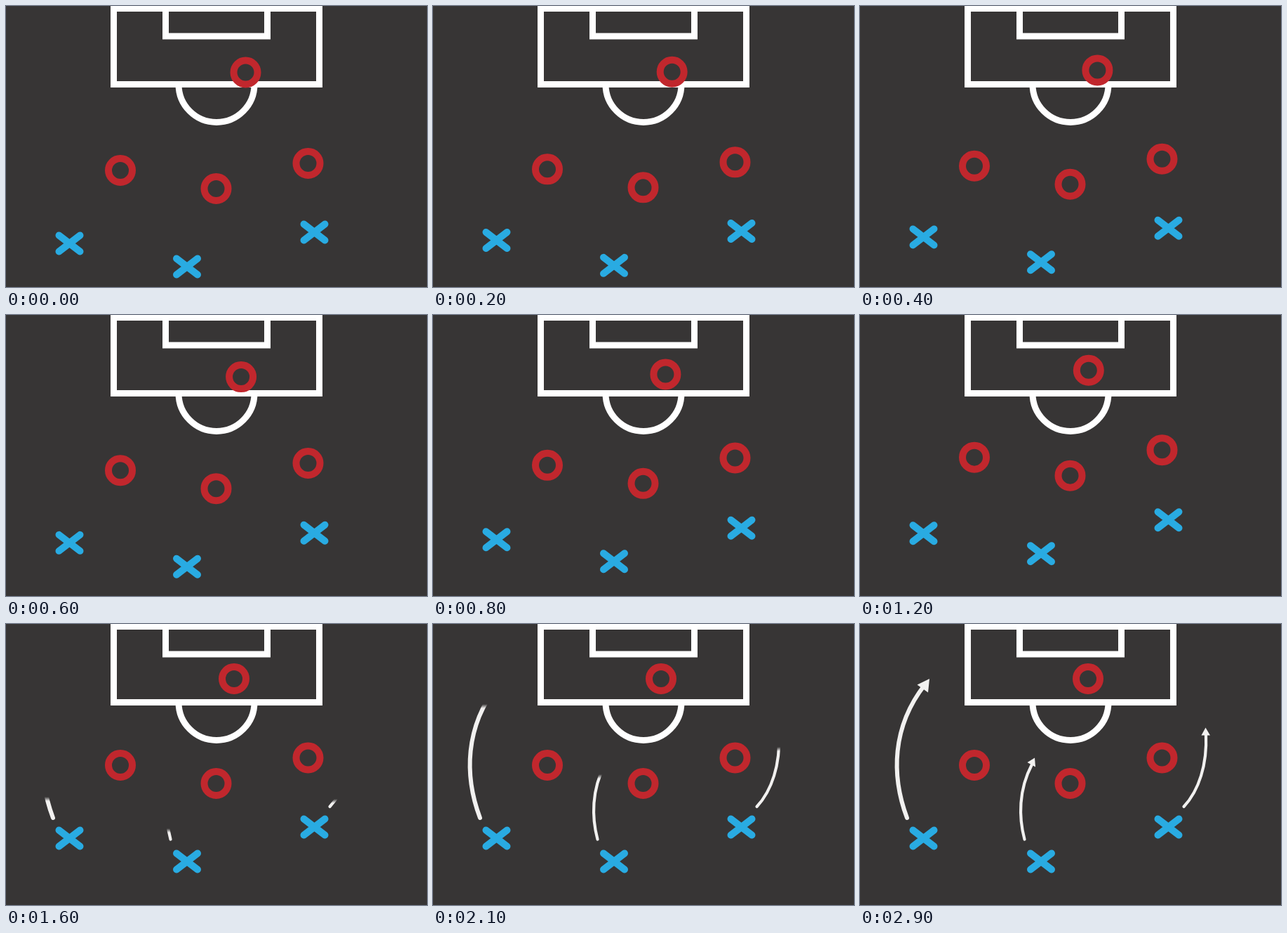
These frames come from a looping animation (600x400 px, 3000 ms). An HTML page with a canvas:

```html
<!DOCTYPE html>
<html lang="en">
<head>
<meta charset="utf-8">
<title>Football tactics</title>
<style>
html, body { margin: 0; overflow: hidden; background: #373535; }
canvas { display: block; }
</style>
</head>
<body>
<canvas id="stage" width="600" height="400"></canvas>
<script>
const ctx = document.getElementById('stage').getContext('2d');
const LOOP = 3000, STEP = 100;

const sine = p => (1 - Math.cos(Math.PI * p)) / 2;
const linear = p => p;

// Start position, travel, duration and easing of each player
const defenders = [
  { x: 341.5, y: 94.5, dx: -16.5, dy: -16.5 },
  { x: 163, y: 234, dy: -33 },
  { x: 299.5, y: 260, dy: -33 },
  { x: 430.5, y: 224, dy: -33.5 }
];
const attackers = [
  { x: 90.5, y: 338, dy: -33, time: 1450, ease: linear },
  { x: 258, y: 371, dy: -33 },
  { x: 439.5, y: 322, dy: -33, time: 1470 }
];

// Each arrow is wiped upwards; "edge" is the wipe height at 1600 ms, "speed" in px/ms
const arrows = [
  { line: 'M67,276 C44,215 46,146 92,87', head: 'M99,78 L81.5,86.5 L97,97.5Z',
    width: 6, edge: 249, speed: 0.264 },
  { line: 'M234.5,306.5 C226,275 226,236 245,200', head: 'M249,190.5 L238.5,197 L250,203.5Z',
    width: 4.2, edge: 294, speed: 0.154 },
  { line: 'M461.5,260 C483,237 495,200 493,157', head: 'M492.5,147.5 L486.5,158.5 L499,158.5Z',
    width: 4.2, edge: 252, speed: 0.148 }
].map(a => ({ ...a, line: new Path2D(a.line), head: new Path2D(a.head) }));

const pitch = new Path2D(
  'M153.5,3.5H446.5V111.5H153.5Z M227.5,3.5V43H372.5V3.5 M246,111.5A54,54 0 0 0 354,111.5');
const ring = new Path2D('M17,0A17,17 0 1 1 -17,0A17,17 0 1 1 17,0Z');
const cross = new Path2D('M-15,-11.5L15,11.5M15,-11.5L-15,11.5');

function stroke(path, color, width, cap = 'butt') {
  ctx.strokeStyle = color;
  ctx.lineWidth = width;
  ctx.lineCap = cap;
  ctx.stroke(path);
}

function drawPlayer({ x, y, dx = 0, dy, time = 1400, ease = sine }, t, shape, color) {
  const p = ease(Math.min(t / time, 1));
  ctx.save();
  ctx.translate(x + dx * p, y + dy * p);
  stroke(shape, color, 10, 'round');
  ctx.restore();
}

function drawArrow({ line, head, width, edge, speed }, t) {
  const y = edge - speed * (t - 1600);
  const fade = ctx.createLinearGradient(0, y - 3, 0, y + 3);
  fade.addColorStop(0, 'rgba(242,241,240,0)');
  fade.addColorStop(1, 'rgb(242,241,240)');
  stroke(line, fade, width, 'round');
  ctx.fillStyle = fade;
  ctx.fill(head);
}

function draw(t) {
  ctx.fillStyle = '#373535';
  ctx.fillRect(0, 0, 600, 400);
  stroke(pitch, '#fff', 9);
  defenders.forEach(d => drawPlayer(d, t, ring, '#c1272d'));
  attackers.forEach(a => drawPlayer(a, t, cross, '#29abe2'));
  if (t >= 1500) arrows.forEach(a => drawArrow(a, t));
}

const start = performance.now();
function tick() {
  const t = (performance.now() - start) % LOOP;
  draw(Math.floor(t / STEP) * STEP);
  requestAnimationFrame(tick);
}
tick();
</script>
</body>
</html>
```
